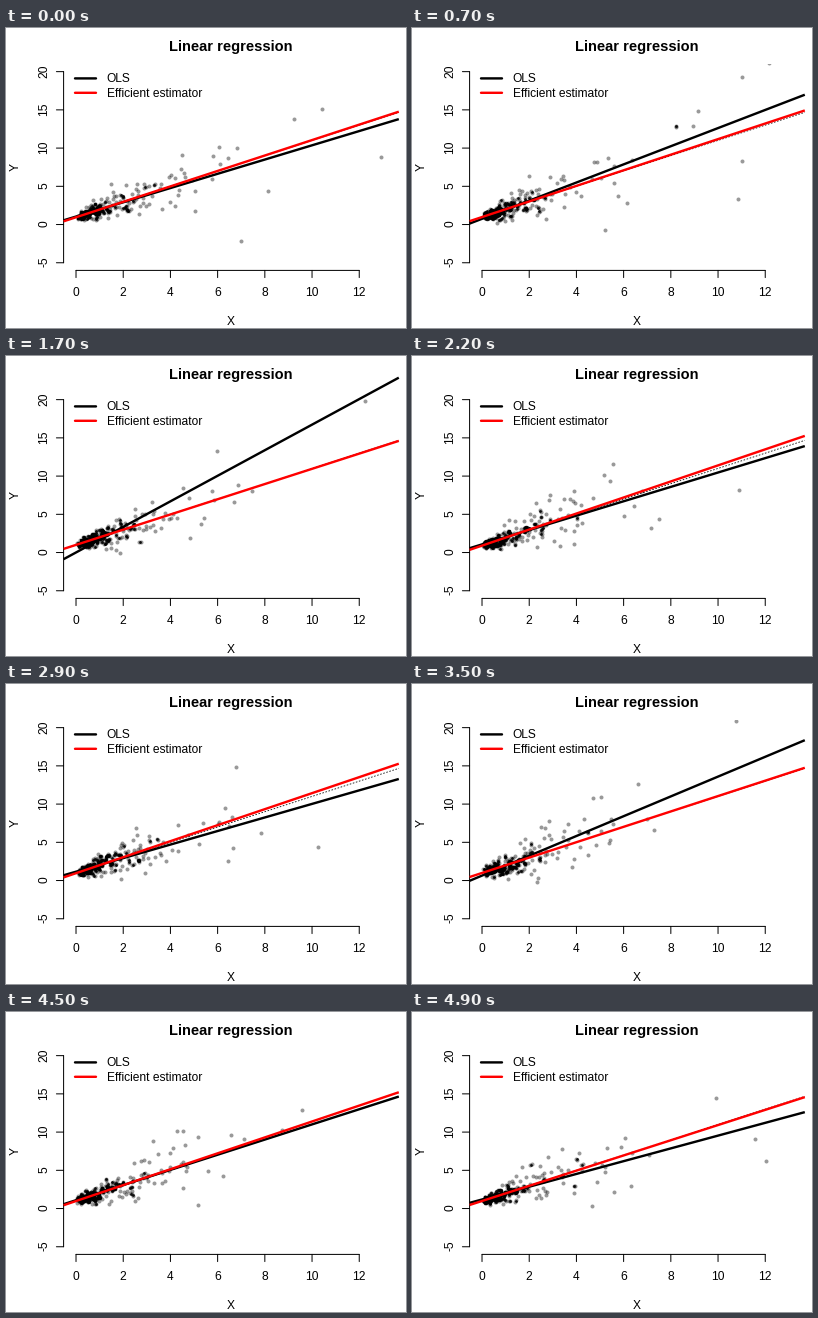
These frames come from a looping animation (400 px wide and 300 px high, 5000 ms). A matplotlib script:

```python
import numpy as np
import matplotlib.pyplot as plt
from matplotlib.animation import FuncAnimation
from matplotlib.patches import Rectangle

plt.rcParams["font.family"] = "Liberation Sans"

WIDTH, HEIGHT, DPI = 400, 300, 100
PX = 72 / DPI                      # one pixel in points
LEFT, RIGHT, TOP, BOTTOM = 57.6, 392.8, 36, 242.4
X_MAX, Y_MIN, Y_MAX = 13.15, -5, 20
X_SCALE = (RIGHT - LEFT) / (1.08 * X_MAX)
Y_SCALE = (BOTTOM - TOP) / (1.08 * (Y_MAX - Y_MIN))
EDGES = np.array([-0.04, 1.04]) * X_MAX
FRAMES, INTERVAL, SAMPLE = 50, 100, 230
OVERLAP = 2.4                      # dots closer than this darken to black


def to_px(x):
    return LEFT + (x + 0.04 * X_MAX) * X_SCALE


def to_py(y):
    return BOTTOM - (y - Y_MIN + 0.04 * (Y_MAX - Y_MIN)) * Y_SCALE


fig = plt.figure(figsize=(WIDTH / DPI, HEIGHT / DPI), dpi=DPI, facecolor="white")
ax = fig.add_axes([0, 0, 1, 1])
ax.set_xlim(0, WIDTH)
ax.set_ylim(HEIGHT, 0)
ax.axis("off")


def line(xs, ys, color="black", width=1, cap="butt", **style):
    return ax.plot(xs, ys, color=color, lw=width * PX, snap=False,
                   solid_capstyle=cap, **style)[0]


def label(x, y, text, size=12, ha="center", **style):
    ax.text(x, y, text, fontsize=size * PX, ha=ha, va="baseline",
            rotation_mode="anchor", **style)


def draw_axes():
    line([to_px(0), to_px(12)], [BOTTOM, BOTTOM], cap="round")
    for x in range(0, 13, 2):
        line([to_px(x)] * 2, [BOTTOM, BOTTOM + 7.2], cap="round")
        label(to_px(x) - 0.3, 268.3, str(x))
    line([LEFT, LEFT], [to_py(-5), to_py(20)], cap="round")
    for y in range(-5, 21, 5):
        line([LEFT - 7.2, LEFT], [to_py(y)] * 2, cap="round")
        label(41.5, to_py(y) - 0.7, str(y), rotation=90)
    label(225.2, 297.1, "X")
    label(12.6, 138.8, "Y", rotation=90)
    label(225.2, 23, "Linear regression", 14.6, weight="bold")


def draw_legend():
    rows = (("OLS", "black", 50.4), ("Efficient estimator", "red", 64.8))
    for text, color, y in rows:
        line([69, 90], [y, y], color, 2.4, "round")
        label(100.8, y + 4.1, text, ha="left")


def dot_layer(size, alpha):
    layer = ax.scatter([], [], s=(size * PX) ** 2, c="black", alpha=alpha,
                       linewidths=0, zorder=2)
    layer.set_clip_path(plot_area)
    return layer


def overlap_centres(points):
    """Midpoints of all pairs of dots that lie almost on each other."""
    first, second = np.triu_indices(len(points), 1)
    gap = np.linalg.norm(points[first] - points[second], axis=1)
    close = gap < OVERLAP
    return (points[first[close]] + points[second[close]]) / 2


def fit_ends(x, y, weights):
    return to_py(np.polyval(np.polyfit(x, y, 1, w=weights), EDGES))


draw_axes()
draw_legend()
plot_area = Rectangle((LEFT, TOP), RIGHT - LEFT, BOTTOM - TOP,
                      transform=ax.transData)
dots = dot_layer(4, 0.4)
overlaps = dot_layer(2.8, 0.85)
line([LEFT, RIGHT], to_py(1 + EDGES), width=0.8, ls=(0, (2, 2)), zorder=3)
ols_line = line([LEFT, RIGHT], [0, 0], "black", 2.4, zorder=4)
efficient_line = line([LEFT, RIGHT], [0, 0], "red", 2.4, zorder=5)


def update(frame):
    # A fresh sample each step; its noise grows with x.
    rng = np.random.default_rng(500 + frame)
    x = rng.lognormal(0, 1, SAMPLE)
    spread = 0.2 + 0.45 * x
    y = 1 + x + spread * rng.standard_normal(SAMPLE)
    points = np.column_stack([to_px(x), to_py(y)])
    dots.set_offsets(points)
    overlaps.set_offsets(overlap_centres(points))
    ols_line.set_ydata(fit_ends(x, y, np.ones(SAMPLE)))
    efficient_line.set_ydata(fit_ends(x, y, 1 / spread))
    return dots, overlaps, ols_line, efficient_line


animation = FuncAnimation(fig, update, frames=FRAMES, interval=INTERVAL,
                          repeat=True, repeat_delay=0, blit=False)
plt.show()
```
